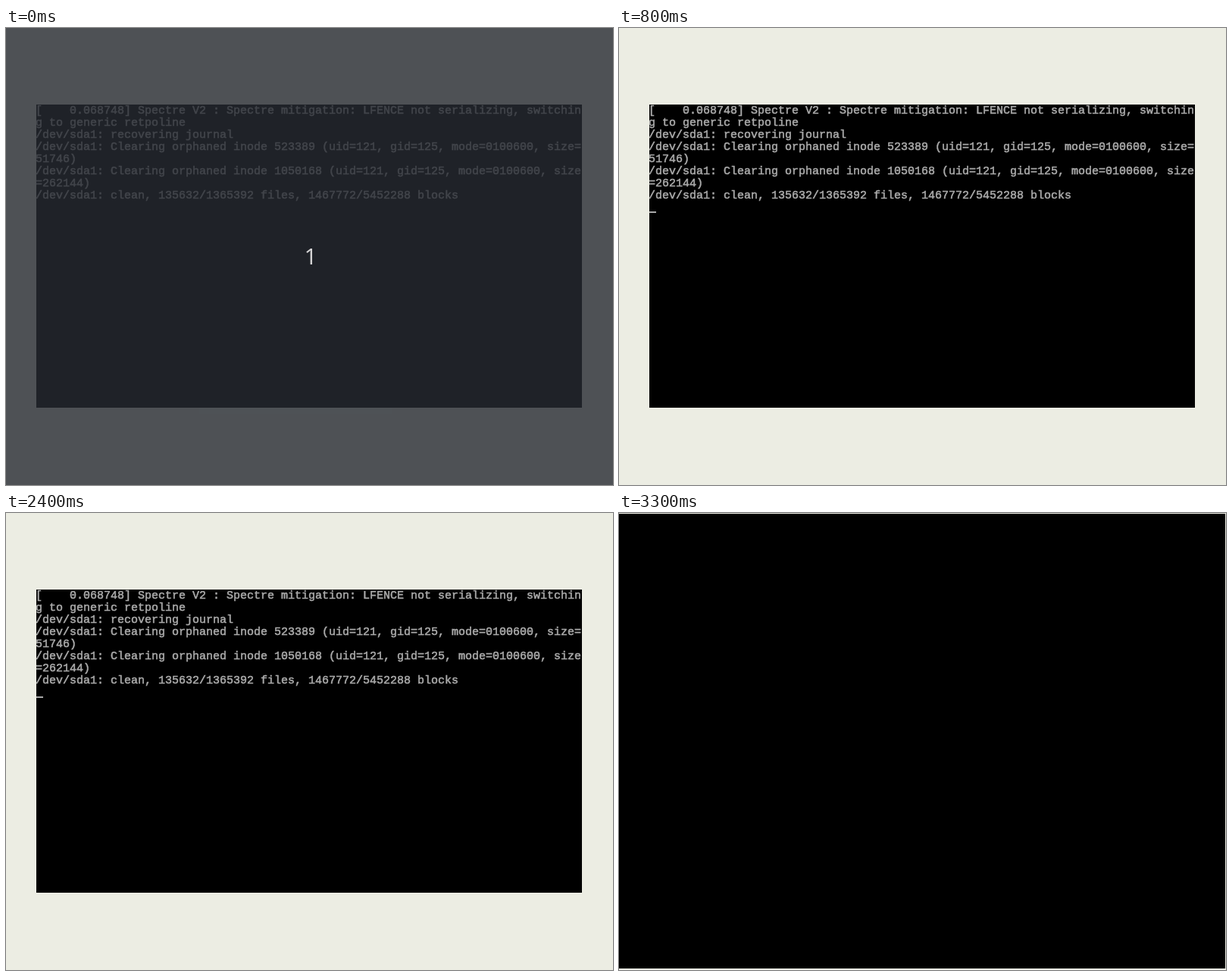
An HTML page that plays this animation: 801x603 px, repeating every 8 s.

```html
<!DOCTYPE html>
<html lang="en">
<head>
<meta charset="utf-8">
<title>Boot console</title>
<style>
  html, body { margin: 0; width: 100%; height: 100%; overflow: hidden; background: #ecede3; }
  svg { display: block; width: 801px; height: 603px; }

  .console text {
    font: 15px "Liberation Mono", "Courier New", monospace;
    white-space: pre;
    fill: #aaa;
    stroke: #aaa;
    stroke-width: .55px;
  }
  .digit { font: 30px "Open Sans", "Noto Sans", sans-serif; fill: #d6d5d6; }

  .countdown, .cursor, .blank { animation: 8s step-end infinite; }
  .countdown { animation-name: countdown; }
  .cursor { animation-name: blink; }
  .blank { animation-name: blank; }

  @keyframes countdown {
    0% { opacity: 1; }
    2.5%, 100% { opacity: 0; }
  }
  @keyframes blink {
    0%, 7.5%, 17.5%, 22.5%, 32.5% { opacity: 0; }
    6.25%, 10%, 20%, 30%, 37.5%, 100% { opacity: 1; }
  }
  @keyframes blank {
    0% { opacity: 0; }
    41.25%, 100% { opacity: 1; }
  }
</style>
</head>
<body>
<svg viewBox="0 0 801 603">
  <rect width="801" height="603" fill="#ecede3"/>

  <svg class="console" x="40" y="101" width="720" height="400" overflow="hidden">
    <rect width="720" height="400"/>
    <g transform="translate(-1 12)">
      <text>[    0.068748] Spectre V2 : Spectre mitigation: LFENCE not serializing, switchin</text>
      <text y="16">g to generic retpoline</text>
      <text y="32">/dev/sda1: recovering journal</text>
      <text y="48">/dev/sda1: Clearing orphaned inode 523389 (uid=121, gid=125, mode=0100600, size=</text>
      <text y="64">51746)</text>
      <text y="80">/dev/sda1: Clearing orphaned inode 1050168 (uid=121, gid=125, mode=0100600, size</text>
      <text y="96">=262144)</text>
      <text y="112">/dev/sda1: clean, 135632/1365392 files, 1467772/5452288 blocks</text>
    </g>
    <rect class="cursor" y="141" width="9" height="2" fill="#aaa"/>
  </svg>

  <g class="countdown">
    <rect width="801" height="603" fill="#272b33" fill-opacity=".8"/>
    <text class="digit" x="393.5" y="312">1</text>
  </g>

  <rect class="blank" y="1" width="800" height="600"/>
</svg>
</body>
</html>
```
